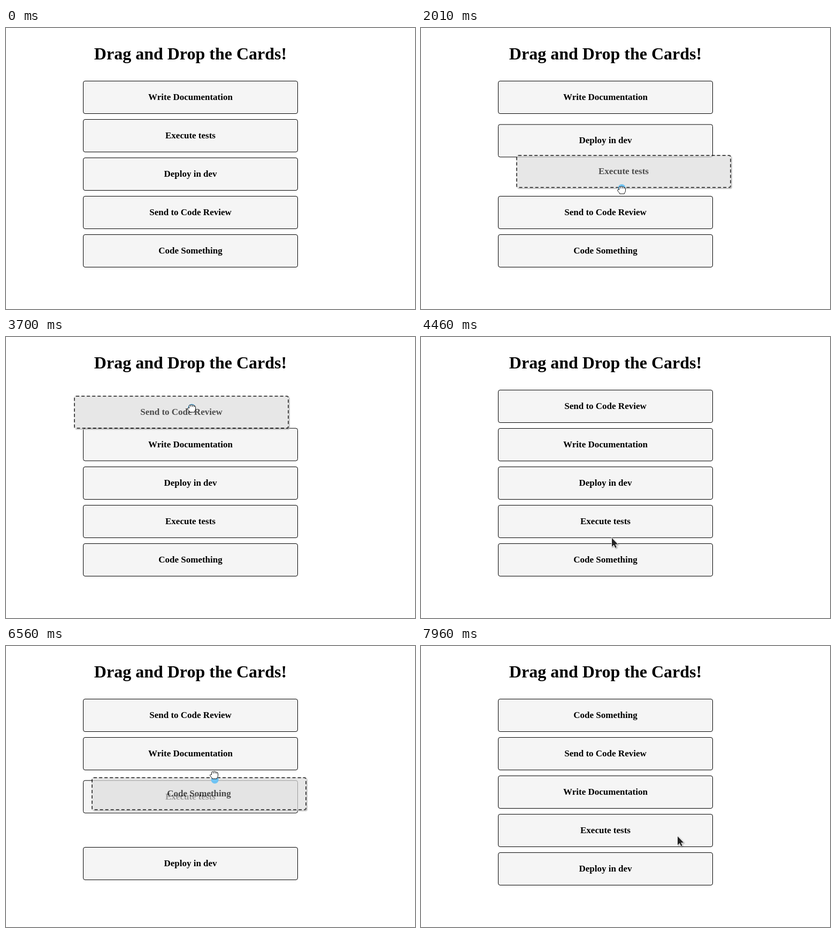
An HTML page with a canvas for the animation above (8000 ms loop, 765 px wide and 527 px high).

```html
<!DOCTYPE html>
<html lang="en">
<head>
<meta charset="utf-8">
<title>Drag and Drop the Cards!</title>
<style>
  html, body { margin: 0; width: 100%; height: 100%; overflow: hidden; background: #fff; }
  body { position: relative; font-family: "Liberation Serif", "Times New Roman", serif; font-weight: bold; color: #000; }
  h1 { position: absolute; left: 144px; top: 30px; width: 402px; margin: 0; font-size: 32px; line-height: 36px; text-align: center; white-space: nowrap; }
  .card {
    position: absolute; left: 0; top: 0; width: 402px; height: 62px; box-sizing: border-box;
    padding-top: 20px; border: 1px solid #000; border-radius: 4px; background: #f5f5f5;
    font-size: 17px; line-height: 19px; text-align: center;
  }
  .card.held {
    z-index: 1; padding-top: 19px; border: 2px dashed #000; background: #ddd;
    opacity: .7; box-shadow: 2px 2px 1px #b0b0b0;
  }
  canvas { position: absolute; left: 0; top: 0; z-index: 2; }
</style>
</head>
<body>
<h1>Drag and Drop the Cards!</h1>
<canvas width="765" height="527"></canvas>
<script>
const LOOP = 8000, LEFT = 144, TOP = 99, STEP = 72, HEIGHT = 62;
const APPEAR = 250;   // the pointer shows up
const TRAVEL = 340;   // one free pointer move
const LAG = 50;       // held card trails the pointer
const REACT = 8;      // neighbours notice a little later
const SHIFT = 200, DROP = 340;

const clamp = x => Math.min(1, Math.max(0, x));
const slotY = i => TOP + i * STEP;
const easeOut = u => u * (2 - u);
const smooth = u => u * u * (3 - 2 * u);

function bezier(x1, y1, x2, y2) {
  const curve = (a, b, s) => 3 * a * s * (1 - s) ** 2 + 3 * b * s * s * (1 - s) + s ** 3;
  return x => {
    if (x <= 0) return 0;
    if (x >= 1) return 1;
    let lo = 0, hi = 1;
    for (let i = 0; i < 24; i++) {
      const mid = (lo + hi) / 2;
      if (curve(x1, x2, mid) < x) lo = mid; else hi = mid;
    }
    return curve(y1, y2, lo);
  };
}
const easeShift = bezier(.2, 0, 0, 1), easeDrop = bezier(.2, 1, .1, 1);

// The pointer's path is a chain of legs, each bowed sideways and eased
const legs = [], drags = [];
let pos = [391, 150], order = [0, 1, 2, 3, 4];

function addLeg(start, time, dx, dy, bow, ease) {
  legs.push({ start, time, x: pos[0], y: pos[1], dx, dy, bow, ease });
  pos = [pos[0] + dx, pos[1] + dy];
}

function pointer(t) {
  const leg = legs.filter(l => l.start <= t).pop() || legs[0];
  const u = clamp((t - leg.start) / leg.time), k = leg.ease(u);
  return [leg.x + leg.dx * k + leg.bow * 4 * u * (1 - u), leg.y + leg.dy * k];
}

function hover(start, x, y) {
  addLeg(start, TRAVEL, x - pos[0], y - pos[1], 0, smooth);
}

function heldAt(drag, t) {
  const [x, y] = pointer(Math.max(drag.down, t - LAG));
  return [Math.round(LEFT + x - drag.grab[0]), Math.round(slotY(drag.from) + y - drag.grab[1])];
}

// A neighbour steps aside once the held card's leading edge passes its middle
function carry(card, { down, up, time, by: [dx, dy], bow, ease = easeOut }) {
  const drag = { card, down, up, order, from: order.indexOf(card), grab: pos, moved: {} };
  addLeg(down, time, dx, dy, bow, ease);
  let to = drag.from;
  for (let t = down; t <= up; t++) {
    const y = heldAt(drag, t)[1];
    order.forEach((id, i) => {
      if (id in drag.moved) return;
      const middle = slotY(i) + HEIGHT / 2;
      const dir = i > drag.from && y + HEIGHT > middle ? -1 : i < drag.from && y < middle ? 1 : 0;
      if (!dir) return;
      drag.moved[id] = { t: t + REACT, dir };
      to -= dir;
    });
  }
  drag.to = to;
  order = order.filter(id => id !== card);
  order.splice(to, 0, card);
  drags.push(drag);
}

const titles = ['Write Documentation', 'Execute tests', 'Deploy in dev', 'Send to Code Review', 'Code Something'];
const [WRITE, TEST, , REVIEW, CODE] = titles.keys();

hover(APPEAR, 384, 132);
carry(WRITE, { down: 590, up: 1150, time: 400, by: [18, 83], bow: 10 });
hover(1150, 340, 154);
carry(TEST, { down: 1490, up: 2690, time: 1200, by: [29, 220], bow: 16 });
hover(2700, 364, 267);
carry(REVIEW, { down: 3280, up: 3780, time: 300, by: [-17, -133], bow: 11 });
hover(3920, 358, 421);
hover(4260, 356, 352);
carry(TEST, { down: 4850, up: 5400, time: 512, by: [0, -95], bow: 5 });
hover(5400, 626, 320);
hover(5740, 376, 436);
carry(CODE, { down: 6309, up: 7190, time: 420, by: [-10, -299], bow: 20.7, ease: smooth });
hover(7190, 550, 418);
hover(7610, 480, 357);

const canvas = document.querySelector('canvas'), ctx = canvas.getContext('2d');
const cards = titles.map(text => {
  const el = document.createElement('div');
  el.className = 'card';
  el.textContent = text;
  document.body.insertBefore(el, canvas);
  return el;
});

const arrow = new Path2D('M0 0V16.2L3.8 12.8L6.3 18.4L8.7 17.3L6.2 11.8H11.3Z');
const hand = new Path2D('M-4.5-.5V-4.5Q-4.5-6.5-2.8-6.5Q-1.5-6.5-1.3-5.6Q-1-7 .4-7Q1.8-7 2-5.6Q2.4-6.5 3.6-6.2Q4.9-6 5-4.8Q7.5-5 7.5-2.8V1.5Q7.3 4 5.5 5.5V7H-3.5V5.5Q-5.5 4-7 1.5Q-8-.5-6.5-1Q-5.2-1.2-4.5-.5Z');
const knuckles = new Path2D('M-1.3-5.6V-3M2-5.6V-3M5-4.8V-2.6');

function place(id, x, y, held) {
  cards[id].style.transform = `translate(${x}px, ${y}px)`;
  cards[id].classList.toggle('held', held);
}

function drawPointer(t, drag) {
  ctx.clearRect(0, 0, canvas.width, canvas.height);
  if (t < APPEAR) return;
  const pressed = drag && t < drag.up;
  if (pressed && t > drag.down + 30) {
    const [cx, cy] = pointer(t - 10);
    ctx.fillStyle = '#6fc3f3';
    ctx.beginPath();
    ctx.arc(cx + .5, cy - 1.5, 7, 0, Math.PI * 2);
    ctx.fill();
  }
  const [x, y] = pointer(t).map(Math.round);
  ctx.save();
  ctx.translate(x, y);
  ctx.lineWidth = 1;
  ctx.lineJoin = 'round';
  if (pressed) {
    ctx.fillStyle = '#fff';
    ctx.strokeStyle = '#111';
    ctx.fill(hand);
    ctx.stroke(hand);
    ctx.stroke(knuckles);
  } else {
    ctx.shadowColor = 'rgba(0,0,0,.4)';
    ctx.shadowBlur = 2;
    ctx.shadowOffsetX = ctx.shadowOffsetY = 1;
    ctx.strokeStyle = '#fff';
    ctx.lineWidth = 1.6;
    ctx.stroke(arrow);
    ctx.shadowColor = 'transparent';
    ctx.fillStyle = '#222';
    ctx.fill(arrow);
  }
  ctx.restore();
}

function draw(t) {
  const drag = drags.filter(d => d.down <= t).pop();
  (drag || drags[0]).order.forEach((id, i) => {
    if (!drag) return place(id, LEFT, slotY(i), false);
    if (id === drag.card) {
      const k = easeDrop((t - drag.up) / DROP);
      const [x, y] = heldAt(drag, Math.min(t, drag.up));
      const held = t > drag.down + LAG && t < drag.up + DROP;
      place(id, x + (LEFT - x) * k, y + (slotY(drag.to) - y) * k, held);
    } else {
      const m = drag.moved[id];
      const k = m ? m.dir * easeShift((t - m.t) / SHIFT) : 0;
      place(id, LEFT, slotY(i) + STEP * k, false);
    }
  });
  drawPointer(t, drag);
}

const start = performance.now();
function tick() {
  draw((performance.now() - start) % LOOP);
  requestAnimationFrame(tick);
}
tick();
</script>
</body>
</html>
```
